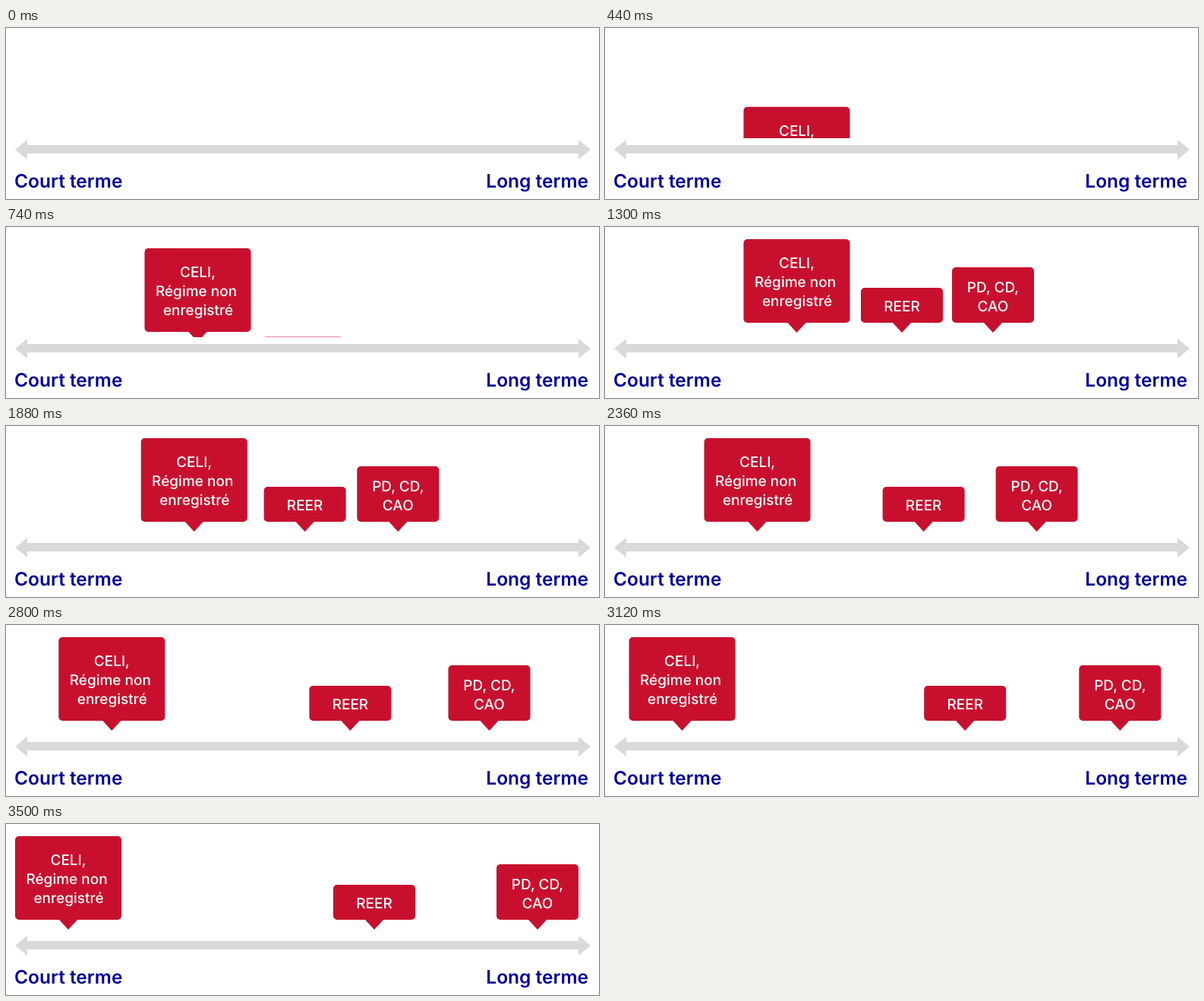
Animation, 781 px wide and 225 px high, one loop 3.6 s. Source, as an HTML page:

```html
<!DOCTYPE html>
<html lang="fr">
<head>
<meta charset="utf-8">
<title>Court terme, long terme</title>
<style>
  html, body { margin: 0; width: 100%; height: 100%; overflow: hidden; background: #fff; }
  svg { display: block; }
  text { font-family: Inter, "Open Sans", sans-serif; text-rendering: geometricPrecision; }
  .end { font-size: 24.5px; font-weight: 600; fill: #000099; }
  .card text { font-size: 19px; font-weight: 500; fill: #fff; text-anchor: middle; }
  .card path { fill: #c8102e; }
</style>
</head>
<body>
<svg width="781" height="225" viewBox="0 0 781 225">
  <clipPath id="above"><rect width="781" height="145"/></clipPath>
  <path fill="#d9d9d9" d="M12 160 28 147V154H754V147L770 160 754 173V165H28V173Z"/>
  <text class="end" x="11" y="210">Court terme</text>
  <text class="end" x="767" y="210" text-anchor="end">Long terme</text>
  <g id="cards" clip-path="url(#above)"></g>
</svg>
<script>
  const LOOP = 3600, STEP = 20;
  const FLOOR = 145, BASE = 126, LINE = 25;
  const SLIDE = [1700, 3500];

  // lines: [text, horizontal offset]; rise: [start, end] in ms
  const cards = [
    { w: 140, h: 110, from: 182.5, to: 12, rise: [180, 870], last: 104,
      lines: [['CELI,', 0], ['Régime non', -2], ['enregistré', 0.5]] },
    { w: 108, h: 46, from: 337, to: 431, rise: [722, 1120], last: 111,
      lines: [['REER', 0]] },
    { w: 108, h: 73, from: 457, to: 646, rise: [860, 1300], last: 111,
      lines: [['PD, CD,', 0], ['CAO', 0]] }
  ];

  const add = (parent, tag, attrs) => {
    const el = document.createElementNS('http://www.w3.org/2000/svg', tag);
    for (const key in attrs) el.setAttribute(key, attrs[key]);
    return parent.appendChild(el);
  };

  const bubble = (w, h) => {
    const top = BASE - h, mid = w / 2;
    return `M5 ${top}H${w - 5}a5 5 0 0 1 5 5V${BASE - 5}a5 5 0 0 1-5 5` +
      `H${mid + 12}L${mid} 139 ${mid - 12} ${BASE}H5a5 5 0 0 1-5-5V${top + 5}a5 5 0 0 1 5-5Z`;
  };

  const ease = (t, [start, end]) => {
    const p = Math.min(1, Math.max(0, (t - start) / (end - start)));
    return p * p * (3 - 2 * p);
  };

  const root = document.getElementById('cards');
  for (const c of cards) {
    c.el = add(root, 'g', { class: 'card' });
    add(c.el, 'path', { d: bubble(c.w, c.h) });
    c.lines.forEach(([label, dx], i) => {
      const y = c.last - (c.lines.length - 1 - i) * LINE;
      add(c.el, 'text', { x: c.w / 2 + dx, y }).textContent = label;
    });
  }

  function draw(t) {
    for (const c of cards) {
      const x = c.from + (c.to - c.from) * ease(t, SLIDE);
      const y = (FLOOR - BASE + c.h) * (1 - ease(t, c.rise));
      c.el.setAttribute('transform', `translate(${x.toFixed(2)} ${y.toFixed(2)})`);
    }
  }

  const begin = performance.now();
  function tick() {
    const t = (performance.now() - begin) % LOOP;
    draw(Math.floor(t / STEP) * STEP);
    requestAnimationFrame(tick);
  }
  draw(0);
  requestAnimationFrame(tick);
</script>
</body>
</html>
```
